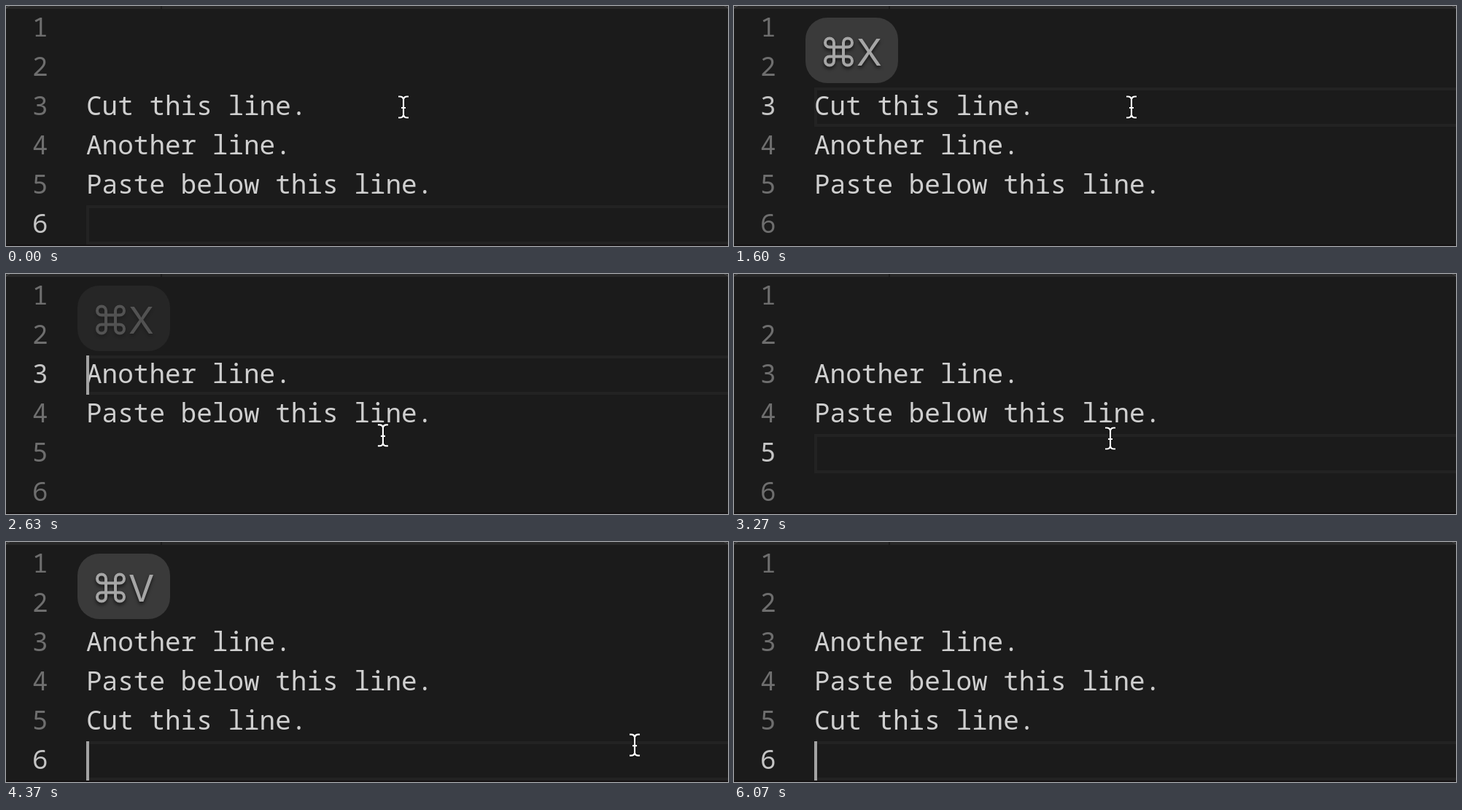
These frames come from a looping animation (990 by 330 pixels, 6360 ms). An HTML page with a canvas:

```html
<!DOCTYPE html>
<html lang="en">
<head>
<meta charset="utf-8">
<title>Cut and paste a line</title>
<style>
  html, body { margin: 0; width: 100%; height: 100%; overflow: hidden; background: #1b1b1b; }
  canvas { display: block; }
</style>
</head>
<body>
<canvas id="stage" width="990" height="330"></canvas>
<script>
const ctx = document.getElementById('stage').getContext('2d');
const LOOP = 6360, ROW = 54;
const CUT = 'Cut this line.', OTHER = 'Another line.', PASTE = 'Paste below this line.';

// Editor states: start time, active row, caret x (null hides it), blink start, text from row 3
const states = [
  [0, 5, null, 0, [CUT, OTHER, PASTE]],
  [30, 2, 410, -30, [CUT, OTHER, PASTE]],
  [1630, 2, 110, 1600, [OTHER, PASTE]],
  [2770, 4, 110, 2770, [OTHER, PASTE]],
  [4070, 5, 110, 4070, [OTHER, PASTE, CUT]],
];

// Pointer path: time, x, y
const pointer = [
  [0, 545, 139], [2370, 545, 139], [2400, 539, 150], [2500, 526, 187],
  [2600, 518, 217], [2670, 516, 226], [3970, 516, 226], [4100, 560, 232],
  [4200, 660, 248], [4300, 785, 267], [4370, 861, 279], [4450, 912, 289],
  [4540, 936, 295], [5300, 936, 295], [5330, 946, 286], [5400, 979, 258],
  [5430, 1010, 235], [LOOP + 100, 1010, 235],
];

// Key hints: letter, time shown, time the fade starts
const hints = [['X', 1570, 2520], ['V', 4040, 4950]];
const FADE = 190;

function text(str, x, y, color) {
  ctx.fillStyle = color;
  ctx.fillText(str, x, y);
}

function drawFrame() {
  ctx.fillStyle = '#1b1b1b';
  ctx.fillRect(0, 0, 990, 330);
  ctx.fillStyle = '#282828';
  ctx.fillRect(0, 0, 990, 4);
  ctx.fillStyle = '#1b1b1b';
  ctx.fillRect(212, 0, 2, 4);
  ctx.fillStyle = '#151213';
  ctx.fillRect(0, 328, 990, 2);
  ctx.strokeStyle = '#4a4a4a';
  ctx.lineWidth = 1;
  ctx.beginPath();
  ctx.moveTo(0, 3);
  ctx.quadraticCurveTo(2, 1, 5, 0);
  ctx.moveTo(985, 0);
  ctx.quadraticCurveTo(988, 1, 990, 3);
  ctx.stroke();
}

function drawEditor(t) {
  const [, active, caret, blink, lines] = states.findLast(s => s[0] <= t);
  const top = 4 + ROW * active;
  ctx.strokeStyle = '#232323';
  ctx.lineWidth = 4;
  ctx.strokeRect(112, top + 2, 1000, ROW - 4);

  ctx.font = '36px "Noto Sans Mono", monospace';
  ctx.textAlign = 'left';
  for (let i = 0; i < 6; i++) {
    const y = 42 + ROW * i;
    text(i + 1, 36, y, i === active ? '#c4c4c4' : '#6e6e6e');
    text(lines[i - 2] || '', 110, y, '#cfcfcf');
  }
  if (caret !== null && (t - blink) % 1000 < 500) {
    ctx.fillStyle = '#a3a3a3';
    ctx.fillRect(caret, top, 4, ROW);
  }
}

function drawHint(letter, alpha) {
  ctx.save();
  ctx.globalAlpha = alpha;
  ctx.fillStyle = '#3a3a3a';
  ctx.beginPath();
  ctx.roundRect(98, 16, 127, 90, 30);
  ctx.fill();
  ctx.shadowColor = 'rgba(0,0,0,.6)';
  ctx.shadowBlur = 4;
  ctx.shadowOffsetY = 3;
  ctx.font = '51px Inter, sans-serif';
  ctx.textAlign = 'center';
  text(letter, 185.5, 81.5, '#a6a6a6');

  // Command sign: a square with a loop at each corner
  const h = 6.5, r = 6, c = h + r;
  ctx.translate(143.5, 63);
  ctx.strokeStyle = '#a6a6a6';
  ctx.lineWidth = 4;
  ctx.beginPath();
  for (let i = 0; i < 4; i++) {
    ctx.moveTo(h, -h);
    ctx.lineTo(h, c);
    ctx.arc(c, c, r, Math.PI, -Math.PI / 2, true);
    ctx.lineTo(h, h);
    ctx.rotate(Math.PI / 2);
  }
  ctx.stroke();
  ctx.restore();
}

function drawPointer(t) {
  const next = pointer.findIndex(p => p[0] > t);
  const [t0, x0, y0] = pointer[next - 1], [t1, x1, y1] = pointer[next];
  const k = (t - t0) / (t1 - t0);
  ctx.save();
  ctx.translate(x0 + (x1 - x0) * k, y0 + (y1 - y0) * k);
  const beam = new Path2D(
    'M-7-14.5H-4.5Q-1-14.5 0-11Q1-14.5 4.5-14.5H7M0-11V11M-7 14.5H-4.5Q-1 14.5 0 11Q1 14.5 4.5 14.5H7M-3 1H3');
  for (const [color, width] of [['#111', 5], ['#fff', 2.2]]) {
    ctx.strokeStyle = color;
    ctx.lineWidth = width;
    ctx.stroke(beam);
  }
  ctx.restore();
}

function draw(now) {
  const t = Math.floor((now % LOOP + 5) * 0.03) / 0.03 + 5;
  drawFrame();
  drawEditor(t);
  for (const [letter, start, end] of hints) {
    const alpha = Math.min(1, 1 - (t - end) / FADE);
    if (t >= start && alpha > 0) drawHint(letter, alpha);
  }
  drawPointer(t);
}

const begin = performance.now();
function tick() {
  draw(performance.now() - begin);
  requestAnimationFrame(tick);
}
tick();
</script>
</body>
</html>
```
